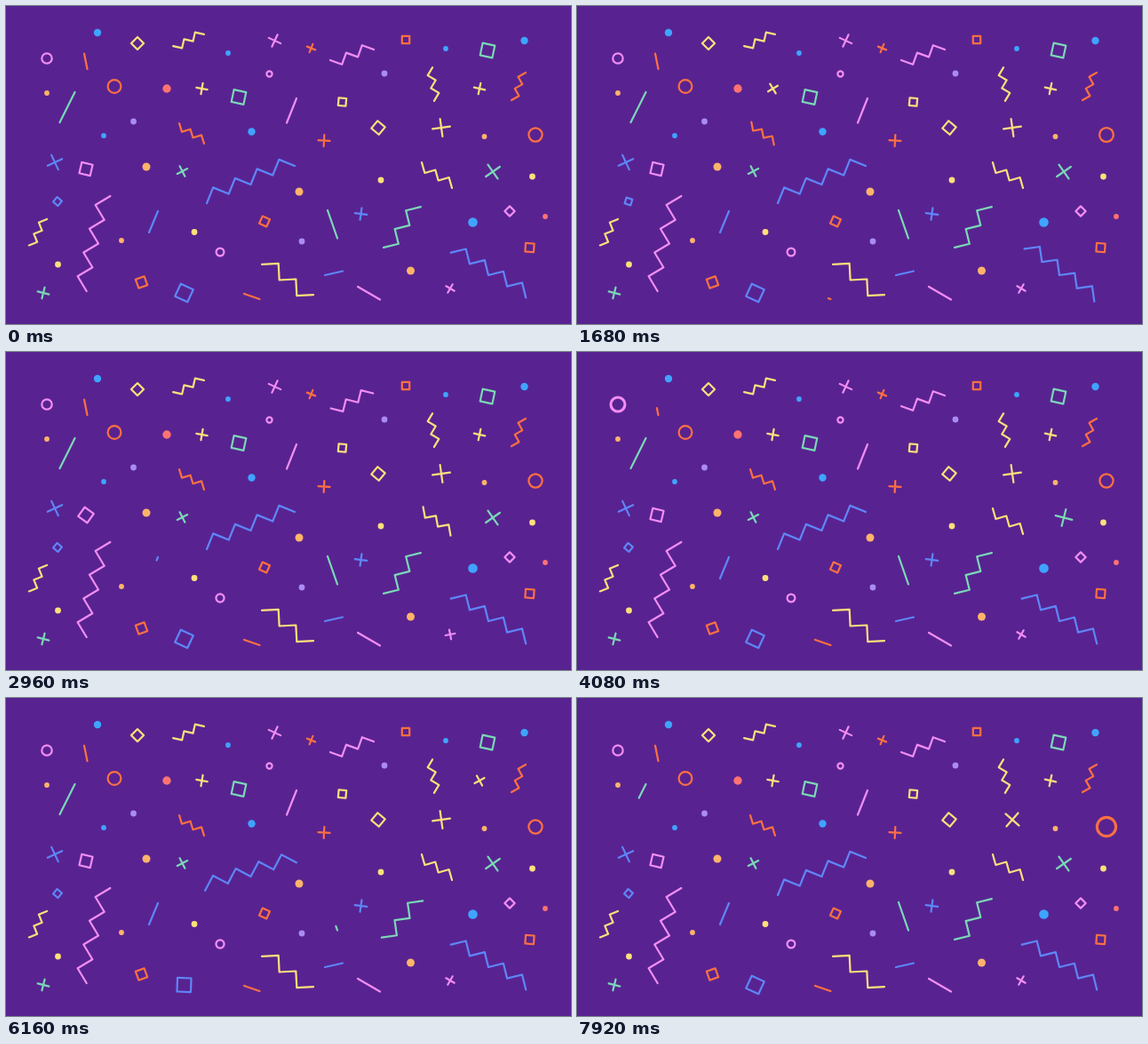
Recreate the animation shown at these times as an HTML page. Size 636 by 358 pixels, loop 8 s.

```html
<!DOCTYPE html>
<html lang="en">
<head>
<meta charset="utf-8">
<title>Confetti pattern</title>
<style>
  html, body { margin: 0; width: 100%; height: 100%; overflow: hidden; background: #582391; }
  svg { display: block; width: 100vw; height: 100vh; }
  .stroke { fill: none; stroke-width: 2.2; stroke-linecap: round; stroke-linejoin: round; }
</style>
</head>
<body>
<svg id="stage" viewBox="0 0 636 358"></svg>
<script>
const LOOP = 8, STEP = 0.08;
const BEAT = 0.64; // every shape type takes turns on this beat
const yellow = '#ffe07a', green = '#7bd8b6', pink = '#f38df4', blue = '#5f86f7',
      sky = '#3fa4ff', orange = '#ff7041', peach = '#ffb46a', coral = '#ff7272', lilac = '#aa8bf4';

const stage = document.getElementById('stage');
const movers = [];

function add(tag, attrs) {
  const el = document.createElementNS('http://www.w3.org/2000/svg', tag);
  for (const key in attrs) el.setAttribute(key, attrs[key]);
  stage.append(el);
  return el;
}

const path = (d, stroke) => add('path', { d, stroke, class: 'stroke' });
const ease = u => u * u * (3 - 2 * u);
const pulse = u => Math.sin(Math.PI * u);
const wobble = u => Math.sin(2 * Math.PI * u);

// progress 0..1 of a turn that begins `delay` after its beat and recurs every `beats`
function turn(t, beat, delay, length, beats = LOOP / BEAT) {
  const since = t - beat * BEAT - delay;
  const u = since % (beats * BEAT) / length;
  return since > 0 && u < 1 ? u : 0;
}

function rotate(el, x, y, angle, swing) {
  movers.push(t => el.setAttribute('transform', `translate(${x} ${y}) rotate(${angle + swing(t)})`));
}

function dots(fill, r, ...points) {
  for (const [cx, cy] of points) add('circle', { cx, cy, r, fill });
}

dots(sky, 5.3, [525.5, 243.5]);
dots(sky, 4.2, [103, 30], [276.5, 141.5], [583.5, 39]);
dots(sky, 2.9, [250, 53], [110, 146], [495, 48]);
dots(peach, 4.5, [455.5, 298], [330, 209], [158, 181]);
dots(peach, 2.9, [46, 98], [538.5, 147], [130, 264]);
dots(yellow, 3.4, [422, 196], [592.5, 192], [212, 254.5], [58.5, 291]);
dots(lilac, 3.4, [143.5, 130], [426, 76], [333, 265]);
dots(coral, 4.7, [181, 93]);
dots(coral, 2.9, [607, 237]);

// x, y, radius, colour: one ring swells per beat
[
  [122, 90.5, 7.4, orange], [46, 59, 5.7, pink], [596, 145, 7.6, orange],
  [296.5, 76.5, 3.1, pink], [241, 277, 4.4, pink]
].forEach(([x, y, r, stroke], i, all) => {
  const el = add('circle', { r, stroke, class: 'stroke' });
  movers.push(t => {
    const grow = 1 + 0.4 * pulse(turn(t, i, 0.07, 0.34, all.length));
    el.setAttribute('transform', `translate(${x} ${y}) scale(${grow})`);
  });
});

// x, y, side, angle, colour: one square wobbles per beat
[
  [148, 42, 10, 45, yellow], [450, 38, 8.4, 0, orange], [58, 220, 7, 40, blue],
  [542, 50, 14, 12, green], [90, 183.5, 12.6, 13, pink], [262, 102.5, 14, 12, green],
  [589.5, 272, 9.6, 4, orange], [152.5, 311, 10.4, -20, orange], [378.5, 108, 8.6, 5, yellow],
  [200.5, 323, 15.5, 25, blue], [419, 137, 11, 40, yellow], [291, 242.5, 9, 25, orange],
  [567, 231, 8, 45, pink]
].forEach(([x, y, side, angle, colour], i) => {
  const h = side / 2, tilt = i % 4 ? -23 : 23;
  const el = path(`M${-h} ${-h}h${side}v${side}h${-side}z`, colour);
  rotate(el, x, y, angle, t => tilt * wobble(turn(t, i, 0.26, 0.6)));
});

// x, y, arm, angle, colour: one cross swings per beat, after a beat of rest
[
  [302.5, 39, 7.4, 25, pink], [220.5, 93, 6.3, 10, yellow], [343.5, 47.5, 5, 22, orange],
  [500, 318, 5.4, 30, pink], [358, 151.5, 6.5, 3, orange], [548, 186.5, 9.6, -35, green],
  [198.5, 186, 6.4, -27, green], [55, 176, 9, -25, blue], [533, 93, 6.3, 12, yellow],
  [399.5, 234, 6.8, 8, blue], [42, 323, 6.5, 14, green], [490, 137, 10, -8, yellow]
].forEach(([x, y, arm, angle, colour], i) => {
  const el = path(`M${-arm} 0H${arm}M0 ${-arm}V${arm}`, colour);
  rotate(el, x, y, angle, t => 56 * pulse(turn(t, i + 1, 0.07, 0.5)));
});

// x, y, leg, heading, legs, colour, swing: staircases of equal legs, two wobble per beat
[
  [481, 88, 10.5, 121, 5, yellow], [317, 308, 18.7, -3, 5, yellow],
  [577, 90.5, 9.7, 151, 5, orange, -1], [36, 254.7, 9.9, 158, 5, yellow, -1],
  [209, 143.5, 10, 73, 5, orange], [543, 303, 17.4, 256, 8, blue],
  [275.5, 201, 19, 202, 8, blue], [446, 249, 17.2, -14, 5, green],
  [485, 190.5, 12.4, 74, 5, yellow], [389.5, 55, 14, 20, 5, pink, -1],
  [104, 267.5, 19.5, 149, 8, pink], [205.5, 38.5, 10.3, 13, 5, yellow]
].forEach(([x, y, leg, heading, legs, colour, swing = 1], i, all) => {
  const rise = i === 1 ? leg : -leg; // a single staircase is mirrored
  const across = Math.ceil(legs / 2), up = legs - across;
  let d = `M${-across * leg / 2} ${-up * rise / 2}`;
  for (let k = 0; k < legs; k++) d += k % 2 ? `v${rise}` : `h${leg}`;
  rotate(path(d, colour), x, y, heading,
    t => 6 * swing * wobble(turn(t, i >> 1, 0.26, 0.6, all.length / 2)));
});

// from, to, colour, beat: a line wipes away towards its end, then grows from its start
[
  [60.5, 131, 77.5, 97, green, 12], [88, 53.5, 91.5, 71, orange, 6], [161, 255, 171, 231, blue, 4],
  [362, 230, 373, 261.5, green, 9], [268, 324, 285.5, 330, orange, 2], [316, 131.5, 327, 104, pink, 0.5],
  [359, 303, 379, 298.5, blue, 0.5], [396, 316, 421, 330.5, pink, 10]
].forEach(([x0, y0, x1, y1, colour, beat]) => {
  const el = path('', colour);
  const at = k => `${x0 + (x1 - x0) * k} ${y0 + (y1 - y0) * k}`;
  movers.push(t => {
    const u = 2 * turn(t, beat, -0.13, 1.4);
    const from = u < 1 ? ease(u) : 0;
    const to = u > 1 ? ease(u - 1) : 1;
    el.setAttribute('d', to - from > 0.01 ? `M${at(from)}L${at(to)}` : '');
  });
});

const origin = performance.now();

function draw(now) {
  const elapsed = Math.max(0, now - origin) / 1000 % LOOP;
  const t = Math.floor(elapsed / STEP + 1e-6) * STEP;
  for (const move of movers) move(t);
  requestAnimationFrame(draw);
}

draw(origin);
</script>
</body>
</html>
```
